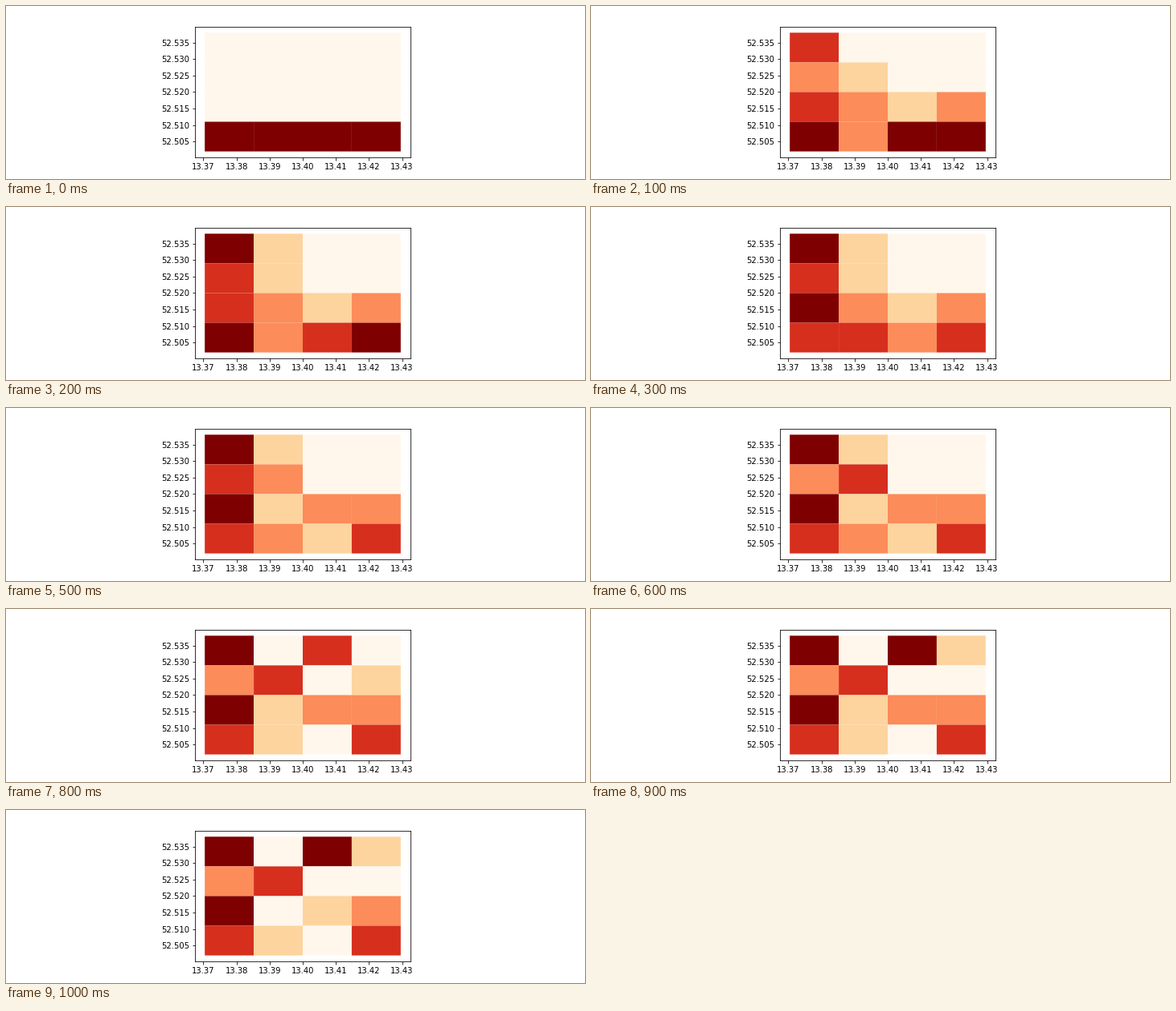
Animation, 720 px wide and 216 px high, one loop 1100 ms. Source, as a matplotlib script:

```python
import matplotlib.pyplot as plt
import numpy as np
from matplotlib.animation import FuncAnimation
from matplotlib.collections import PolyCollection

plt.rcParams["font.family"] = "DejaVu Sans"
plt.rcParams["font.size"] = 10

N = 4
LON, LAT = 13.40, 52.52              # centre of the grid
DLAT = 0.009                         # cell height in degrees
DLON = DLAT / np.cos(np.radians(LAT))
INTERVAL = 100

# Quantile classes, low to high: Light, Pale, Orange, Red, Dark
CLASSES = "LPORD"
COLORS = plt.get_cmap("OrRd")(np.linspace(0, 1, len(CLASSES)))

# (grid rows from north to south, duration in steps)
STATES = [
    ("LLLL LLLL LLLL DDDD", 1),
    ("RLLL OPLL ROPO DODD", 1),
    ("DPLL RPLL ROPO DORD", 1),
    ("DPLL RPLL DOPO RROR", 2),
    ("DPLL ROLL DPOO ROPR", 1),
    ("DPLL ORLL DPOO ROPR", 2),
    ("DLRL ORLP DPOO RPLR", 1),
    ("DLDP ORLL DPOO RPLR", 1),
    ("DLDP ORLL DLPO RPLR", 1),
]
TIMELINE = [grid for grid, steps in STATES for _ in range(steps)]


def cell(row, col):
    west = LON + (col - N / 2) * DLON
    north = LAT + (N / 2 - row) * DLAT
    east, south = west + DLON, north - DLAT
    return [(west, north), (east, north), (east, south), (west, south)]


def cell_colors(grid):
    return [COLORS[CLASSES.index(c)] for c in grid.replace(" ", "")]


fig = plt.figure(figsize=(10, 3), dpi=72, facecolor="white")
ax = fig.add_axes([0.125, 0.125, 0.775, 0.755])
ax.set_aspect("equal")

half = N / 2 * 1.1                   # 5 % margin on each side
ax.set_xlim(LON - half * DLON, LON + half * DLON)
ax.set_ylim(LAT - half * DLAT, LAT + half * DLAT)

xticks = np.linspace(13.37, 13.43, 7)
yticks = np.linspace(52.505, 52.535, 7)
ax.set_xticks(xticks, [f"{x:.2f}" for x in xticks])
ax.set_yticks(yticks, [f"{y:.3f}" for y in yticks])

cells = PolyCollection(
    [cell(row, col) for row in range(N) for col in range(N)],
    facecolors=cell_colors(TIMELINE[0]), edgecolors="none", linewidths=0,
)
cells.set_snap(False)
ax.add_collection(cells, autolim=False)


def update(step):
    cells.set_facecolor(cell_colors(TIMELINE[step]))
    return [cells]


anim = FuncAnimation(fig, update, frames=len(TIMELINE), interval=INTERVAL,
                     repeat=True, repeat_delay=0, blit=False)
plt.show()
```
